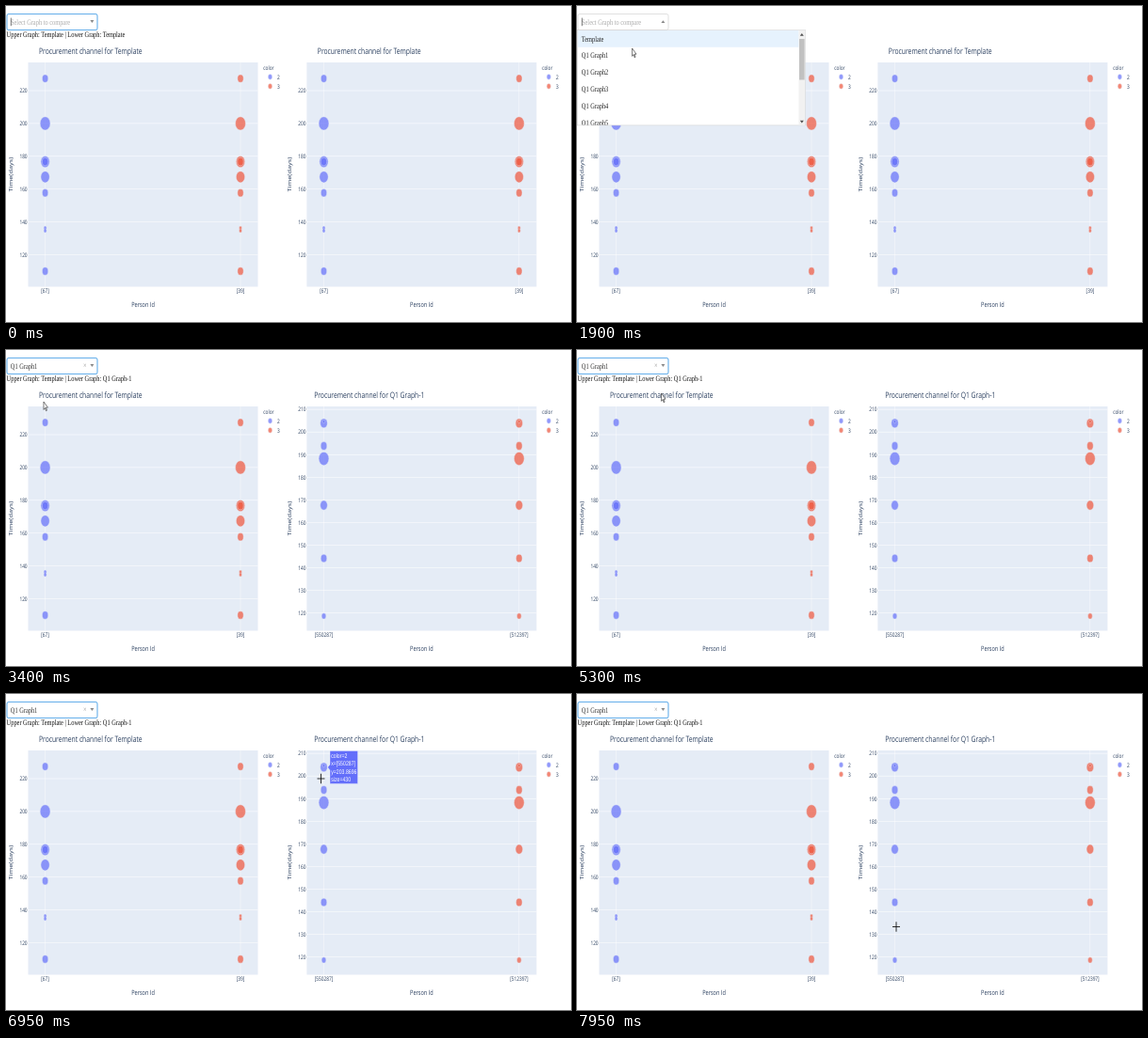
An HTML page for the animation above (8000 ms loop, 600 px wide and 336 px high).

```html
<!DOCTYPE html>
<html lang="en">
<head>
<meta charset="utf-8">
<title>Graph comparison</title>
<style>
  html, body { margin: 0; width: 100%; height: 100%; overflow: hidden; background: #fff; }
  svg { display: block; width: 600px; height: 336px; }
  text { text-rendering: geometricPrecision; white-space: pre; }
  .plot { font-family: "Open Sans", sans-serif; fill: #2a3f5f; }
  .page { font-family: "Liberation Serif", serif; }
  .tip { font-family: "Liberation Sans", sans-serif; fill: #fff; }
</style>
</head>
<body>
<svg id="stage" viewBox="0 0 600 336"></svg>
<script>
const LOOP = 8000, OPEN = 1650, PICK = 2450, LOAD = 2800;
const SX = 0.398, SY = 0.524; // page pixels to stage pixels
const BLUE = '#636efa', RED = '#ef553b', PAPER = '#e5ecf6';
const stage = document.getElementById('stage');

// Everything on the page shares one scale; positions are stage pixels.
const at = (x, y, inner) => `<g transform="translate(${x} ${y}) scale(${SX} ${SY})">${inner}</g>`;
const text = (x, y, size, str, cls = 'plot', attrs = '') =>
  at(x, y, `<text class="${cls}" font-size="${size}" ${attrs}>${str}</text>`);
const MID = 'text-anchor="middle"', END = 'text-anchor="end"';
const rect = (x, y, w, h, fill, attrs = '') =>
  `<rect x="${x}" y="${y}" width="${w}" height="${h}" fill="${fill}" ${attrs}/>`;
const group = (id, inner) => `<g id="${id}">${inner}</g>`;
const marker = (x, y, r, color) =>
  at(x, y, `<circle r="${r}" fill="${color}" stroke="${PAPER}" opacity=".7"/>`);
const triangle = (x, y, dir, color) =>
  `<path d="M${x - 2} ${y - dir * 1.3}h4l-2 ${dir * 2.8}z" fill="${color}"/>`;

const template = {
  title: 'Template', labels: ['[67]', '[39]'],
  top: 220, low: 120, step: 20, yAt: v => 90 + (220 - v) * 1.745,
  points: [[227.4, 8], [200, 13.7], [176.7, 11.7], [176.7, 8], [167.4, 11.7],
           [157.7, 8], [136.3, 4], [134.6, 4], [110, 8]]
};
const quarter = {
  title: 'Q1 Graph-1', labels: ['[550287]', '[512397]'],
  top: 210, low: 120, step: 10, yAt: v => 279.5 - (v - 120) * 2.404,
  points: [[203.8696, 9.5], [204.6, 3.2], [193.8412, 8.4], [188.2174, 13.6],
           [167.6087, 9.7], [144.1304, 8.2], [118.5652, 6]]
};

function chart(dx, data) {
  const xs = [41.6 + dx, 249 + dx];
  let out = rect(23.5 + dx, 60, 244, 238.5, PAPER);
  xs.forEach((x, i) => {
    out += rect(x - SX / 2, 60, SX, 238.5, '#fff');
    out += text(x, 305.4, 12, data.labels[i], 'plot', MID);
  });
  for (let v = data.top; v >= data.low; v -= data.step) {
    const y = data.yAt(v);
    out += rect(23.5 + dx, y - SY / 2, 244, SY, '#fff');
    out += text(22.6 + dx, y + 2.3, 12, v, 'plot', END);
  }
  [BLUE, RED].forEach((color, i) => {
    for (const [v, r] of data.points) out += marker(xs[i], data.yAt(v), r, color);
    out += marker(280.5 + dx, 75.3 + i * 10, 5.5, color);
    out += text(288 + dx, 77.6 + i * 10, 12, i + 2);
  });
  out += text(273.3 + dx, 68.2, 12, 'color');
  out += text(89.8 + dx, 51, 17, 'Procurement channel for ' + data.title, 'plot', MID);
  out += text(145.5 + dx, 319.7, 14, 'Person Id', 'plot', MID);
  out += text(6.8 + dx, 179, 14, 'Time(days)', 'plot', `${MID} transform="rotate(-90)"`);
  return out;
}

const caption = name => text(0.6, 33.2, 16, `Upper Graph: Template | Lower Graph: ${name}`, 'page', 'fill="#111"');

function menu() {
  const names = ['Template', ...[1, 2, 3, 4, 5].map(n => 'Q1 Graph' + n)];
  return rect(0.5, 25.7, 241.8, 101.2, '#fff', 'stroke="#ccc" stroke-width=".5"') +
    group('focusRow', rect(0.8, 26, 234.7, 17.8, '#e6f2fd')) +
    `<clipPath id="menuClip"><rect x="0" y="26" width="236" height="100.6"/></clipPath><g clip-path="url(#menuClip)">` +
    names.map((n, i) => text(4.8, 37.6 + i * 17.85, 16, n, 'page', 'fill="#222"')).join('') + '</g>' +
    rect(235.5, 26, 6.6, 100.6, '#f1f1f1') + rect(236, 35, 5.6, 43.5, '#c1c1c1') +
    triangle(238.8, 30.5, -1, '#505050') + triangle(238.8, 123, 1, '#505050');
}

function hoverLabel(i) {
  const [v, r] = quarter.points[i], y = quarter.yAt(v);
  const size = Math.round(430 * (r / 9.5) ** 2);
  const lines = ['color=2', 'x=[550287]', 'y=' + v, 'size=' + size];
  return `<path d="M341.6 ${y}l2.4 -3v-14.5h29.6v35h-29.6v-14.5z" fill="${BLUE}" stroke="#fff" stroke-width=".4"/>` +
    lines.map((s, n) => text(345.2, y - 10.3 + n * 8.5, 13, s, 'tip')).join('');
}

const cursors = {
  arrow: '<path d="M0 0v16l3.7-3.4 2.6 6 2.4-1-2.6-5.8h5z" fill="#fff" stroke="#222" stroke-width="1.3"/>',
  hand: '<path d="M-1.5 1q1.5-2 3 0v6l6 1.3q2.5.7 2.5 3l-1 4-1 4h-8l-5-7q-1-2 1-2l2.5 2z" fill="#fff" stroke="#222" stroke-width="1.4"/>',
  cross: '<path d="M-10 0h20M0 -10v20" stroke="#111" stroke-width="1.9"/>'
};

stage.innerHTML =
  chart(0, template) +
  group('before', chart(295.9, template) + caption('Template')) +
  group('after', chart(295.9, quarter) + caption('Q1 Graph-1')) +
  group('label', '') +
  rect(1, 8.5, 96, 17, '#fff', 'id="box" rx="1.6" ry="2.1"') +
  group('empty', text(5, 19.6, 16, 'Select Graph to compare', 'page', 'fill="#aaa"')) +
  group('caret', rect(4.9, 12.6, 0.6, 8.6, '#222')) +
  group('chosen', text(4.8, 19.6, 16, 'Q1 Graph1', 'page', 'fill="#333"') +
    text(83.8, 18.6, 16, '×', 'page', MID + ' fill="#999"')) +
  group('down', triangle(91.4, 16.4, 1, '#888')) +
  group('up', triangle(91.4, 16.8, -1, '#888')) +
  group('menu', menu()) +
  group('pointer', Object.entries(cursors).map(([k, d]) => group(k, at(0, 0, d))).join(''));

const el = id => document.getElementById(id);
const show = (id, on) => { el(id).style.display = on ? '' : 'none'; };

// time, x, y of the pointer's hot spot
const path = [
  [900, 70, 30], [1250, 93.5, 18.3], [1600, 93.5, 18.3], [1900, 58.6, 45], [2300, 40, 55],
  [3400, 40, 55], [3900, 42, 33], [4700, 108, 33], [5300, 89.6, 46], [5600, 110, 46],
  [6200, 380, 47], [6700, 336, 78], [6950, 334.5, 90], [7250, 336, 118], [7950, 339, 247.5]
];

function pointerAt(t) {
  const i = path.findIndex(p => p[0] > t);
  if (i < 0) return path.at(-1).slice(1);
  if (i === 0) return path[0].slice(1);
  const [t0, x0, y0] = path[i - 1], [t1, x1, y1] = path[i];
  const u = (t - t0) / (t1 - t0), k = u * u * (3 - 2 * u);
  return [x0 + (x1 - x0) * k, y0 + (y1 - y0) * k];
}

function hovered(y) {
  let best = -1, least = 9;
  quarter.points.forEach(([v, r], i) => {
    const gap = Math.max(0, Math.abs(quarter.yAt(v) - y) - r * SY);
    if (gap < least) { least = gap; best = i; }
  });
  return best;
}

let shownLabel = -1;
function render(t) {
  const open = t >= OPEN && t < PICK, picked = t >= PICK, loaded = t >= LOAD;
  show('before', !loaded);
  show('after', loaded);
  show('empty', !picked);
  show('chosen', picked);
  show('caret', !picked && (t + 200) % 1000 < 500);
  show('menu', open);
  show('up', open);
  show('down', !open);
  el('box').setAttribute('stroke', open ? '#ccc' : '#64aeea');
  el('box').setAttribute('stroke-width', open ? 0.6 : 1.1);

  const [x, y] = pointerAt(t);
  el('focusRow').setAttribute('transform', `translate(0 ${y > 46 ? 17.85 : 0})`);
  const inPlot = x > 319 && y > 60;
  const kind = inPlot ? 'cross' : t < OPEN && x > 88 ? 'hand' : 'arrow';
  for (const k in cursors) show(k, k === kind);
  show('pointer', t >= path[0][0]);
  el('pointer').setAttribute('transform', `translate(${x} ${y})`);

  const near = inPlot && Math.abs(x - 337.5) < 8 ? hovered(y) : -1;
  if (near !== shownLabel) {
    el('label').innerHTML = near < 0 ? '' : hoverLabel(near);
    shownLabel = near;
  }
}

const start = performance.now();
function tick() {
  render((performance.now() - start) % LOOP);
  requestAnimationFrame(tick);
}
tick();
</script>
</body>
</html>
```
